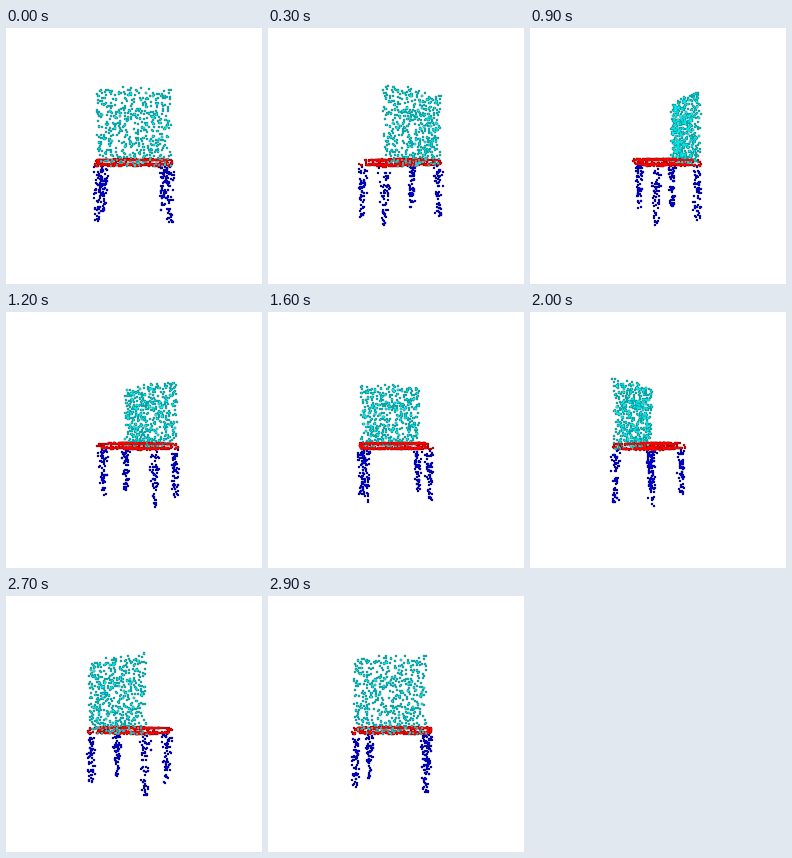
These frames come from a looping animation (256 px wide and 256 px high, 3 s). A matplotlib script:

```python
import numpy as np
import matplotlib.pyplot as plt
from matplotlib.animation import FuncAnimation

SIZE, DPI = 256, 100
FRAMES, INTERVAL = 30, 100
CENTER_X, HORIZON = 127.8, 126.3
CAMERA = 245  # distance from the turning axis, in pixels
CYAN, RED, BLUE = (0, 0.95, 0.95), (1, 0, 0), (0, 0, 0.9)

rng = np.random.default_rng(7)


def backrest(n):
    x = rng.uniform(-33, 33, n)
    y = rng.uniform(26, 31, n)
    top = -59 + 2 * (x / 33) ** 2
    z = top + (10.5 - top) * rng.random(n)
    return np.column_stack([x, y, z])


def seat(n):
    x = rng.uniform(-34, 34, n)
    y = rng.uniform(-17.5, 30, n)
    z = np.where(rng.random(n) < 0.5, 5.4, 10.2)
    kind = rng.random(n)
    rim_x, rim_y = kind < 0.08, kind > 0.93
    x[rim_x] = 34 * np.sign(x[rim_x])
    y[rim_y] = np.where(y[rim_y] < 6, -17.5, 30)
    rim = rim_x | rim_y
    z[rim] = rng.uniform(5.4, 10.2, rim.sum())
    return np.column_stack([x, y, z])


def leg(cx, cy, n):
    t = rng.random(n)
    half = 4 - 1.4 * t
    x = cx + half * rng.uniform(-1, 1, n)
    y = cy + half * rng.uniform(-1, 1, n)
    return np.column_stack([x, y, 11 + 49.5 * t])


parts = [(backrest(540), CYAN), (seat(400), RED)]
for cx, cy in [(-32, 27.5), (32, 27.5), (-31, -11.5), (31, -11.5)]:
    parts.append((leg(cx, cy, 62), BLUE))
points = np.vstack([p for p, _ in parts])
colors = np.vstack([np.tile(c, (len(p), 1)) for p, c in parts])


def project(angle):
    x, y, z = points.T
    c, s = np.cos(angle), np.sin(angle)
    side, near = x * c + y * s, y * c - x * s
    scale = CAMERA / (CAMERA - near)
    pos = np.column_stack([CENTER_X + side * scale, HORIZON + z * scale])
    return np.round(pos), np.argsort(near)


def dot_area(pixels):
    return (pixels * 72 / DPI) ** 2


fig = plt.figure(figsize=(SIZE / DPI, SIZE / DPI), dpi=DPI, facecolor="white")
ax = fig.add_axes([0, 0, 1, 1])
ax.set_xlim(0, SIZE)
ax.set_ylim(SIZE, 0)
ax.axis("off")

# Dark rims lie under all fills, so dense areas look brighter.
start, _ = project(0)
rims = ax.scatter(*start.T, s=dot_area(2.4), linewidths=0, zorder=1)
fills = ax.scatter(*start.T, s=dot_area(1.8), linewidths=0, zorder=2)
rims.set_snap(False)
fills.set_snap(False)


def update(frame):
    pos, order = project(2 * np.pi * frame / FRAMES)
    for dots, shade in ((rims, 0.12), (fills, 1)):
        dots.set_offsets(pos[order])
        dots.set_facecolors(colors[order] * shade)
    return rims, fills


anim = FuncAnimation(fig, update, frames=FRAMES, interval=INTERVAL,
                     repeat=True, repeat_delay=0)
plt.show()
```
